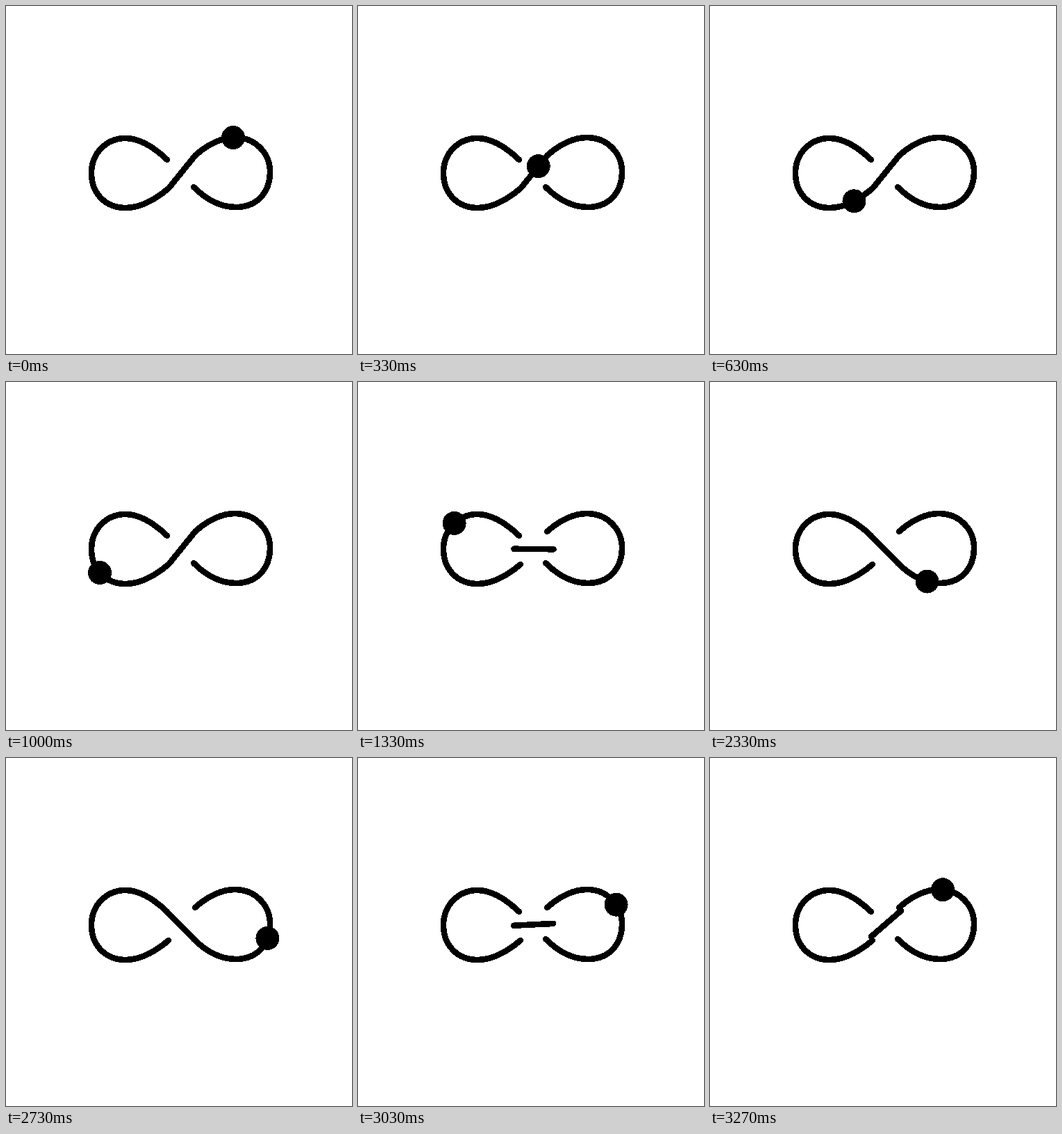
These frames come from a looping animation (498 px wide and 500 px high, 3.31 s). An HTML page:

```html
<!DOCTYPE html>
<html lang="en">
<head>
<meta charset="utf-8">
<title>Infinity track</title>
<style>
  html, body { margin: 0; height: 100%; overflow: hidden; background: #fff; }
  svg { display: block; width: 100vw; height: 100vh; shape-rendering: crispEdges; }
  .line { fill: none; stroke: #000; stroke-width: 8.6; stroke-linecap: round; stroke-linejoin: round; }
</style>
</head>
<body>
<svg viewBox="0 0 498 500">
  <path class="line" id="left"/>
  <path class="line" id="right"/>
  <line class="line" id="gate"/>
  <circle id="ball" r="17"/>
</svg>
<script>
const LOOP = 3310, STEP = 100 / 3, LAST = 98;
const $ = id => document.getElementById(id);
const gate = $('gate'), ball = $('ball');

const leftArc = '234 262 C215 278 194 290 172 290 C143 290 123 269 123 240 ' +
  'C123 212 144 190 172 190 C190 190 211 201 232 221';
const rightLow = '270 260 C288 278 308 289 331 289 C361 289 380 268 380 238 C380 211 358 189 330 189';
const rightTop = 'C309 189 289 200 272 215';
$('left').setAttribute('d', 'M' + leftArc);
$('right').setAttribute('d', `M${rightLow} ${rightTop}`);

// The ball's route crosses the gate twice per loop.
const route = document.createElementNS('http://www.w3.org/2000/svg', 'path');
route.setAttribute('d', `M330 189 ${rightTop} L${leftArc} L${rightLow}`);
const total = route.getTotalLength();

// time, x, y
const stops = [
  [0, 327, 190], [530, 228, 266], [630, 208, 280], [1070, 126, 262],
  [1330, 138, 203], [1600, 190, 194], [1870, 232, 222], [2130, 273, 263],
  [2330, 312, 286], [2670, 373, 268], [2730, 377, 260], [3200, 350, 194],
  [3270, 334, 190]
];

// Nearest distance along the route, searched forward from a given distance.
function locate(x, y, from) {
  let best = from, min = Infinity;
  for (let d = from; d <= Math.min(from + 180, total); d += 0.5) {
    const p = route.getPointAtLength(d);
    const gap = Math.hypot(p.x - x, p.y - y);
    if (gap < min) { min = gap; best = d; }
  }
  return best;
}

let reach = 0;
const travel = stops.map(([t, x, y]) => [t, reach = locate(x, y, reach)]);
travel.push([LOOP, total + travel[0][1]]);

// time, angle, centre x, centre y
const swing = [
  [0, -51, 253.5, 238], [1050, -51, 253.5, 238], [1330, 0, 253, 240],
  [1610, 45, 251.5, 241], [2740, 45, 251.5, 241],
  [3270, -41.4, 253.5, 238], [LOOP, -51, 253.5, 238]
];

function sample(keys, t) {
  let i = 1;
  while (i < keys.length - 1 && keys[i][0] < t) i++;
  const a = keys[i - 1], b = keys[i];
  const k = (t - a[0]) / (b[0] - a[0]);
  return a.slice(1).map((v, j) => v + (b[j + 1] - v) * k);
}

function set(el, attrs) {
  for (const name in attrs) el.setAttribute(name, attrs[name]);
}

function draw(ms) {
  const t = Math.min(LAST, Math.floor((ms % LOOP + 4) / STEP)) * STEP;
  const [dist] = sample(travel, t);
  const p = route.getPointAtLength(dist % total);
  set(ball, { cx: p.x, cy: p.y });

  const [angle, cx, cy] = sample(swing, t);
  const dx = 28.5 * Math.cos(angle * Math.PI / 180);
  const dy = 28.5 * Math.sin(angle * Math.PI / 180);
  set(gate, { x1: cx - dx, y1: cy - dy, x2: cx + dx, y2: cy + dy });
}

let start;
function tick(now) {
  start ??= now;
  draw(now - start);
  requestAnimationFrame(tick);
}
draw(0);
requestAnimationFrame(tick);
</script>
</body>
</html>
```
